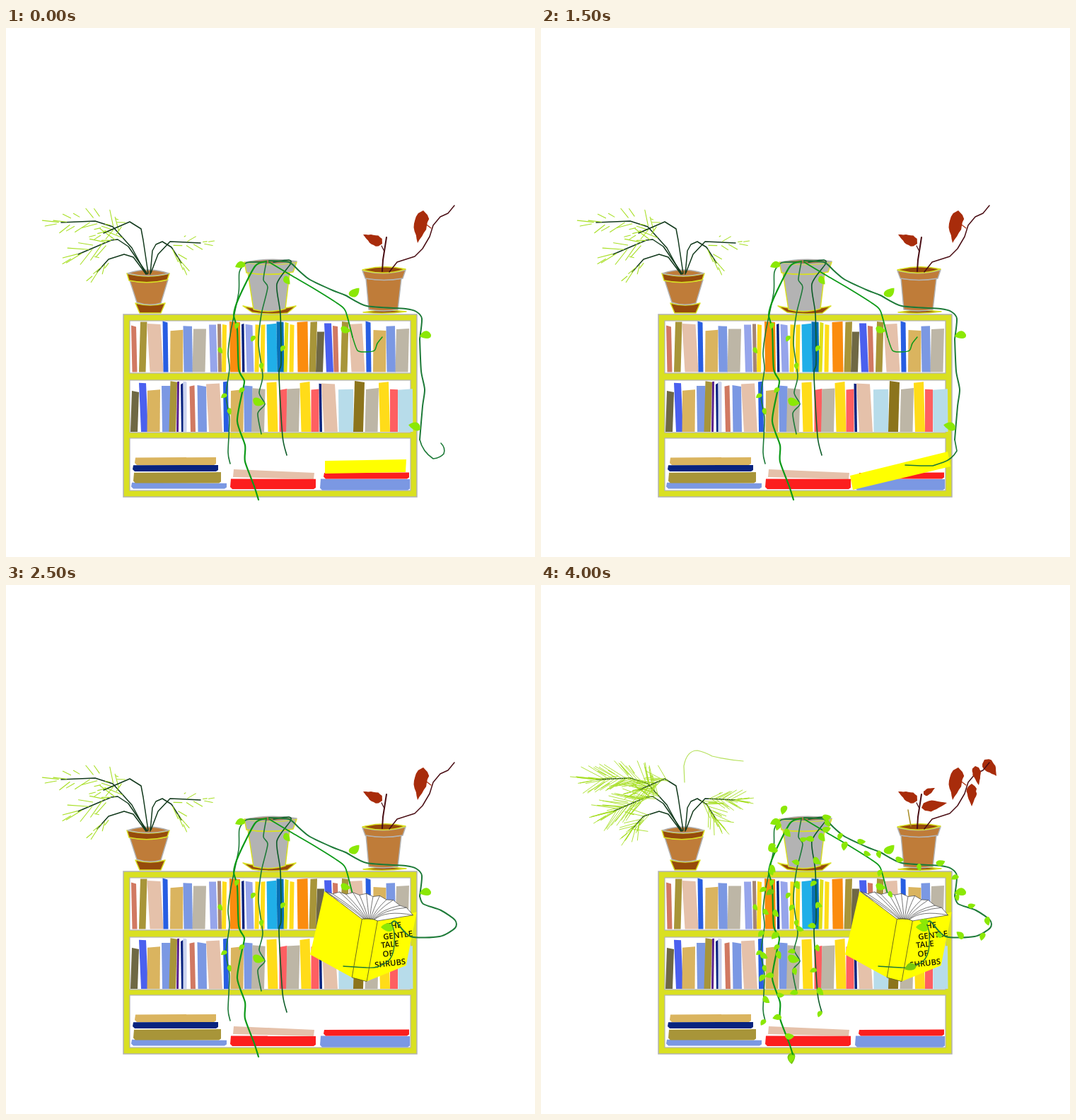
These frames come from a looping animation (748x748 px, 4500 ms). An HTML page:

```html
<!DOCTYPE html>
<html lang="en">
<head>
<meta charset="utf-8">
<title>Plants on a bookshelf</title>
<style>
html, body { margin: 0; width: 100%; height: 100%; overflow: hidden; background: #fff; }
svg { display: block; width: 100vw; height: 100vh; }
text { font: 600 11.3px "Open Sans", "Noto Sans", sans-serif; text-anchor: middle; fill: #151500; }
</style>
</head>
<body>
<svg id="stage" viewBox="0 0 748 748"></svg>
<script>
const STEP = 500, STEPS = 9;
const stage = document.getElementById('stage');
const timed = [];

let seed = 11;
const random = () => (seed = (seed * 16807) % 2147483647) / 2147483647;
const jitter = amount => (random() - 0.5) * 2 * amount;
const between = (low, high) => low + (high - low) * random();

function add(tag, attrs, parent = stage) {
  const el = document.createElementNS('http://www.w3.org/2000/svg', tag);
  for (const key in attrs) el.setAttribute(key, attrs[key]);
  return parent.appendChild(el);
}
// A group visible from one step up to, not including, another.
function during(from, to = STEPS) {
  const group = add('g', {});
  timed.push({ group, from, to });
  return group;
}
const shape = (d, fill, parent = stage, stroke = 'none', width = 1.5) =>
  add('path', { d, fill, stroke, 'stroke-width': width, 'stroke-linejoin': 'round' }, parent);
const line = (points, stroke, width, parent = stage) =>
  add('path', { d: 'M' + points, fill: 'none', stroke, 'stroke-width': width,
    'stroke-linejoin': 'round', 'stroke-linecap': 'round' }, parent);

// A smooth line through a few points
function vine(points, stroke, width, parent) {
  const n = points.split(' ').map(Number), last = n.length / 2 - 1;
  const at = i => { const k = 2 * Math.min(last, Math.max(0, i)); return [n[k], n[k + 1]]; };
  let d = `${at(0)}`;
  for (let i = 0; i < last; i++) {
    const [a, b, c, e] = [at(i - 1), at(i), at(i + 1), at(i + 2)];
    d += `C${b.map((v, k) => v + (c[k] - a[k]) / 8)} ${c.map((v, k) => v - (e[k] - b[k]) / 8)} ${c}`;
  }
  return line(d, stroke, width, parent);
}
// Point and heading at a distance along a path
function along(path, distance) {
  const p = path.getPointAtLength(distance), q = path.getPointAtLength(distance - 5);
  return { x: p.x, y: p.y, angle: Math.atan2(p.y - q.y, p.x - q.x) };
}

const GREY = '#b3b3b3', LIME = '#d9e021', CLAY = '#bf7c39', BROWN = '#964b0c', YELLOW = '#ffff00';

// Bookcase
add('rect', { x: 166, y: 405, width: 415, height: 258, fill: LIME, stroke: GREY, 'stroke-width': 1.5 });
for (const y of [414, 498, 580])
  add('rect', { x: 175, y, width: 397, height: 74, fill: '#fff', stroke: GREY, 'stroke-width': 1.2 });

// Kinds of book: colour, width, height, lean
const BOOKS = {
  c: ['#d17962', 7, 65, 1.5], o: ['#a89539', 9.5, 71, -2], p: ['#e5c1aa', 19, 68, 4],
  b: ['#285ee2', 7, 71, 1], t: ['#dab45f', 18, 59, -0.5], w: ['#7b98e3', 12.5, 65, 1],
  g: ['#bdb6a6', 18, 61, -1.5], l: ['#96a5eb', 10, 67, 2], m: ['#a58574', 5, 68, 1],
  y: ['#ffdc19', 6, 67, -1], Y: ['#ffdc19', 14, 70, 2], a: ['#fb8c0e', 15, 71, 1],
  n: ['#08237f', 3.5, 68, 1], s: ['#20afe8', 14, 68, 1], d: ['#0870b4', 10, 71, 1],
  f: ['#dfe019', 5, 70, -2], k: ['#6f6844', 10, 57, -2], i: ['#4a60ef', 10, 69, 3],
  u: ['#59208f', 3, 71, -1], v: ['#ccd4ef', 5, 71, 0], r: ['#fe5f61', 11, 60, 0],
  e: ['#b7dcea', 21, 60, 0.5], h: ['#8c741c', 14, 71, -2]
};
// Each letter is a book, each space a small gap.
function shelf(x, bottom, row) {
  for (const letter of row) {
    if (letter === ' ') { x += 2; continue; }
    const [colour, w, height, lean] = BOOKS[letter];
    const top = bottom - height, slope = jitter(1);
    shape(`M${x} ${top + slope}L${x + w} ${top - slope} ${x + w + lean} ${bottom} ${x + lean} ${bottom}Z`, colour);
    x += w + (letter === 'p' ? 1 : 0);
  }
}
shelf(177, 486.5, 'c   op b  tw g  l m y  a n l  y y sd f y  a  oki c   op  b  tw g');
shelf(178, 571, 'ki t wou nv  c  wp  b  twg Y  rgY rnp  e h gY re');

function lying(colour, x1, x2, top, bottom, parent) {
  shape(`M${x1} ${top + jitter(0.7)}L${x2} ${top + jitter(0.7)} ${x2} ${bottom - 2} ${x2 - 3} ${bottom}
    ${x1 + 2} ${bottom} ${x1 - 1} ${bottom - 3}Z`, colour, parent);
}
const RED_COVER = '#fc1e1e';
lying(BOOKS.w[0], 178, 312, 643.5, 651.5);
lying(BOOKS.o[0], 181, 304, 628, 643.5);
lying(BOOKS.n[0], 180, 300, 618, 627);
lying(BOOKS.t[0], 183, 297, 607, 618);
shape('M322 624L436 629 435 638 321 635Z', BOOKS.p[0]);
lying(RED_COVER, 318, 438, 637, 652);
lying(BOOKS.w[0], 445, 571, 637.5, 653.5);
lying(RED_COVER, 450, 570, 629, 637.5);
shape('M451 612L566 610 565 628 451 630Z', YELLOW, during(0, 3));
shape('M437 633L575 599 579 620 441 653Z', YELLOW, during(3, 4));

// Pots
shape('M183 389Q204 395 225 389L219 403H189Z', BROWN, stage, LIME);
shape('M175 357Q201 362 229 356L219 389Q202 394 185 388Z', CLAY, stage, GREY);
shape('M171 347Q201 355 231 347L228 356Q201 363 174 357Z', BROWN, stage, LIME);
shape('M172 347Q201 337 230 347Q201 354 172 347Z', CLAY, stage, GREY);

shape('M335 393Q372 402 410 393L398 403Q372 406 348 402Z', BROWN, stage, LIME);
shape('M342 346Q372 351 401 346L395 397Q372 404 350 398Z', GREY, stage, LIME);
shape('M337 331Q373 338 411 331L406 345Q372 351 340 346Z', GREY, stage, LIME);
shape('M339 331Q374 324 411 330Q374 337 339 331Z', '#a5764d', stage, GREY);

shape('M505 402Q535 397 566 401Q536 405 505 402Z', BROWN, stage, LIME);
shape('M509 354Q534 358 559 354L554 398Q534 402 513 398Z', CLAY, stage, GREY);
shape('M504 343Q534 351 565 342L561 354Q534 359 508 354Z', CLAY, stage, GREY);
shape('M504 342Q534 334 565 341Q534 351 504 342Z', BROWN, stage, LIME);

// Fern: leaflets grow along the outer part of each stem, slanting to the tip
const FERN = '#a8df25', STEM = '#12391c';
function leaflets(path, parent, count, start, longest, loose = 0) {
  const total = path.getTotalLength();
  for (let i = 0; i < count; i++) {
    const { x, y, angle } = along(path, total * (start + (1 - start) * (i + 1) / count));
    const turn = angle + (i % 2 ? 1 : -1) * (i > count - 3 ? 0.15 : 0.55 + jitter(0.1));
    const near = loose * random(), far = longest * between(0.75, 1);
    const end = r => `${x + r * Math.cos(turn)} ${y + r * Math.sin(turn)}`;
    line(`${end(near)}L${end(far)}`, FERN, loose ? 1.1 : 0.9, parent);
  }
}
// Stem, share of it left bare, longest leaflet, step when it fills
const fronds = [
  ['198 348L178 311 151 281 126 273 78 275', 0.35, 38, 6],
  ['200 348L173 309 158 299 149 300 102 320', 0.45, 42, 7],
  ['198 348L180 324 167 320 145 327 129 345', 0.6, 28, 7],
  ['201 347L194 300 191 284 175 274 138 290', 0.6, 28, 6],
  ['204 348L207 315 212 306 221 302 234 310 248 332', 0.6, 30, 7],
  ['205 346L215 320 232 302 275 304', 0.58, 27, 7]
];
const lush = during(8);
for (const [points, bare, longest, full] of fronds) {
  const stem = line(points, STEM, 1.5);
  const room = stem.getTotalLength() * (1 - bare);
  leaflets(stem, stage, room / 6.5, bare, longest * 0.75, 14);
  leaflets(stem, during(full), room / 3, bare, longest);
  leaflets(stem, lush, room / 12, bare, longest * 0.9);
}
line('203 279L202 256Q206 234 221 234Q231 236 242 242Q262 247 286 249', '#b5e05a', 1.2, lush);

// Red plant: ragged leaves drawn from base to tip
const RED = '#a82c0b', BARK = '#4a0e14';
function redLeaf(x1, y1, x2, y2, width, parent) {
  const dx = x2 - x1, dy = y2 - y1, length = Math.hypot(dx, dy), count = 9, points = [];
  for (let i = 0; i <= 2 * count; i++) {
    const t = 1 - Math.abs(i / count - 1), side = i < count ? 1 : -1;
    const half = side * width * 0.5 * Math.sin(Math.PI * Math.pow(t, 0.6)) * between(0.85, 1.15) / length;
    points.push(`${x1 + dx * t - dy * half} ${y1 + dy * t + dx * half}`);
  }
  shape(`M${points.join('L')}Z`, RED, parent);
}
line('532 344L533 328 538 296', BARK, 2);
line('535 316L531 308', BARK, 1.2);
line('542 345L553 331 578 323 589 312 599 295 604 279 614 267 625 262 634 251', BARK, 1.5);
line('601 283L588 273', RED, 1.2);
redLeaf(532, 305, 505, 292, 15);
redLeaf(590, 258, 582, 304, 20);
const budding = during(6), leafy = during(7);
redLeaf(614, 256, 619, 283, 12, budding);
redLeaf(541, 296, 557, 287, 9, budding);
redLeaf(538, 315, 574, 308, 15, leafy);
redLeaf(609, 281, 609, 313, 14, leafy);
redLeaf(627, 247, 644, 270, 17, lush);
line('523 341L521 330 519 318', '#a88c25', 1.5, lush);

// Trailing vines
const DEEP = '#1d7a38', FRESH = '#0c9a18', DARK = '#0b5b27';
const trailing = [
  vine('362 331 340 332 330 345 329 374 318 428 314 460 316 482 311 520 316 552 314 600 317 616', DEEP, 1.6),
  vine('368 330 352 337 329 382 322 406 327 426 329 482 337 499 334 515 327 556 338 590 338 613 351 648 357 667', FRESH, 2.2),
  vine('368 331 364 356 370 367 361 405 357 446 363 492 358 516 366 532 356 545 361 574', DEEP, 1.6),
  vine('378 331 400 328 402 334 383 362 388 405 389 474 386 490 391 577 397 604', DARK, 1.6),
  vine('372 331 402 349 433 367 468 389 480 400 490 437', FRESH, 1.8)
];
vine('490 437 497 456 509 458 521 456 525 446 532 437', FRESH, 1.5, during(0, 5));

// Open book
function openBook(parent) {
  const pages = 14, edge = '#555', tips = [];
  for (let i = 0; i < pages; i++) {
    const t = i / (pages - 1);
    tips.push([442 + 124 * t, 550 + 27 * t ** 4 + (i % 2 ? 1.5 : -1.5)]);
  }
  shape('M440 548L494 586 482 669 422 638Z', YELLOW, parent);
  shape('M516 588L571 574 558 650 503 674Z', YELLOW, parent);
  shape(`M494 586L${tips.join(' ')} 516 588Z`, '#fff', parent, edge, 0.8);
  shape('M494 586Q505 583 516 588L503 674 482 669Z', YELLOW, parent, '#55551a', 0.8);
  tips.forEach(([x, y], i) => {
    const foot = 497 + 16 * i / pages;
    line(`${foot} 586Q${foot + (x - 505) * 0.25} 572 ${x} ${y}`, edge, 0.8, parent);
  });
  ['THE', 'GENTLE', 'TALE', 'OF', 'SHRUBS'].forEach((word, i) => {
    const x = 540 - (i > 1 ? 2.5 * i : 0) + (word.length > 5 ? 6 : 0), y = 598 + 13.3 * i;
    add('text', { transform: `translate(${x} ${y}) rotate(-8)` }, parent).textContent = word;
  });
}
openBook(during(4, 5));
const lifted = during(5);
lifted.setAttribute('transform', 'translate(9 -114) rotate(1.5 480 600)');
openBook(lifted);

// The reaching vine and its moving end
trailing.push(vine('372 329 400 331 414 343 430 356 462 371 480 378 510 393 565 397 580 401 588 411 585 440', DEEP, 2));
const hang = during(0, 5), reach = during(5);
vine('585 440 587 485 592 511 589 535 585 582', DEEP, 2, hang);
line('585 582Q589 599 604 609Q614 608 619 602Q622 594 615 587', DEEP, 1.6, during(0, 1));
line('585 582L588 598Q583 611 565 619Q545 629 533 652', DEEP, 1.6, during(1, 2));
line('585 582L588 598Q581 610 569 614L554 619 537 619 515 618', DEEP, 1.6, during(2, 5));
trailing.push(vine('585 440 590 451 615 460 635 474 635 485 613 497 572 497 551 476 545 478', DEEP, 2, reach));
vine('545 478 549 492 548 517 540 532 520 541 477 539', DEEP, 1.4, reach);

// Vine leaves; the angle points to the tip, in degrees
function leaf(x, y, size, angle, parent, fill = '#8be806') {
  shape('M-.9-.25C-.8-1 .25-.75 1 .1C.3.75-.7.95-.9-.25Z', fill, parent)
    .setAttribute('transform', `translate(${x} ${y}) rotate(${angle}) scale(${size})`);
}
leaf(331, 335, 7.5, 150);
leaf(397, 357, 7, 45);
leaf(493, 374, 9, -50);
leaf(480, 427, 7.5, 5);
leaf(593, 434, 8.5, 160);
leaf(357, 529, 9, 5);
leaf(578, 563, 9, 185, hang);
leaf(539, 484, 9, 175, reach);
for (const [x, y] of [[303, 456], [326, 421], [349, 439], [361, 478], [391, 453], [333, 512], [308, 520], [316, 542]])
  leaf(x, y, 5, between(40, 160));

// New leaves sprout on alternating sides, a third of them at each late step
const sprouts = [during(6), during(7), during(8)];
for (const path of trailing) {
  const count = Math.round(path.getTotalLength() / 31);
  for (let i = 0; i < count; i++) {
    const { x, y, angle } = along(path, path.getTotalLength() * (i + 1) / count);
    const side = i % 2 ? 1 : -1, out = angle + side * 1.2;
    leaf(x + 4 * Math.cos(out), y + 4 * Math.sin(out), between(5, 7), angle * 180 / Math.PI + side * between(20, 80),
      sprouts[i % 3], random() < 0.06 ? '#78c80f' : undefined);
  }
}
leaf(354, 669, 8.5, 80, lush, '#78c80f');
leaf(522, 540, 8.5, 150, sprouts[2], '#78c80f');
leaf(343, 318, 7, 100, sprouts[2]);

const started = performance.now();
let shown = -1;
function draw() {
  const step = Math.floor(Math.max(0, performance.now() - started) / STEP) % STEPS;
  if (step !== shown) {
    shown = step;
    for (const { group, from, to } of timed)
      group.style.display = step >= from && step < to ? '' : 'none';
  }
  requestAnimationFrame(draw);
}
draw();
</script>
</body>
</html>
```
